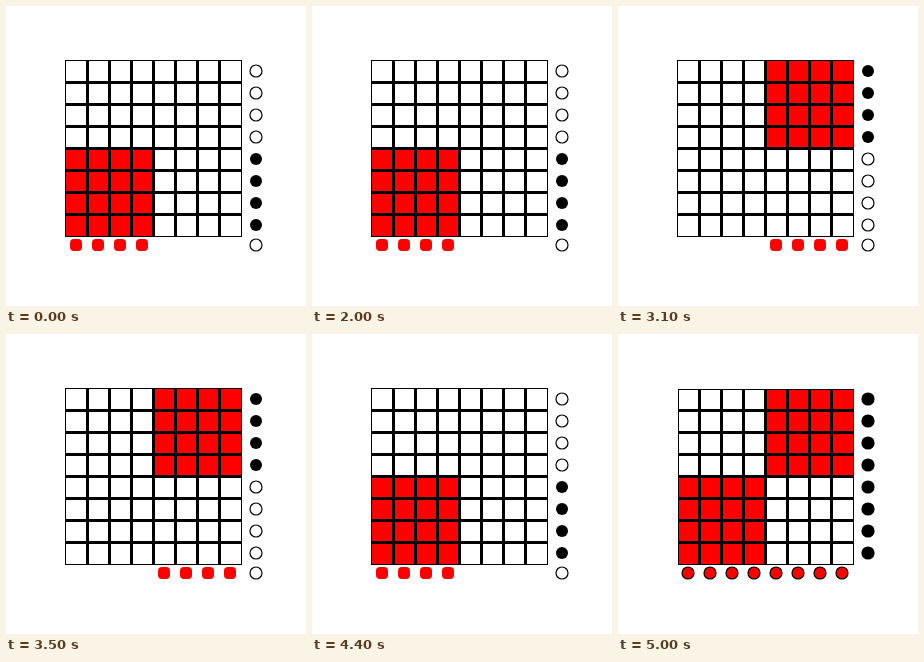
Write an HTML page with a canvas that moves like this. It is 300 by 300 pixels and loops after 10000 ms.

```html
<!DOCTYPE html>
<html lang="en">
<head>
<meta charset="utf-8">
<title>Grid toggle</title>
<style>
html, body { margin: 0; width: 100%; height: 100%; overflow: hidden; background: #fff; }
canvas { display: block; width: 300px; height: 300px; }
</style>
</head>
<body>
<canvas id="stage" width="300" height="300"></canvas>
<script>
const ctx = document.getElementById('stage').getContext('2d');
const LOOP = 10000, N = 8, STEP = 22, X0 = 59, Y0 = 54;
const RED = '#f00', BLACK = '#000', WHITE = '#fff';
const DOT_X = 250, DOT_Y = 239;
const cells = [...Array(N).keys()];
const centre = (origin, i) => origin + 11 + i * STEP;

function stateAt(t) {
  if (t < 1000) return 'low';
  if (t < 2000) return 'high';
  if (t < 2500) return 'low';
  if (t < 3000) return 'high';
  if (t < 5000) return Math.floor((t - 3000) / 100) % 2 ? 'high' : 'low';
  return 'both';
}

function circle(x, y, r, fill, line) {
  ctx.beginPath();
  ctx.arc(x, y, r, 0, Math.PI * 2);
  ctx.fillStyle = fill;
  ctx.fill();
  if (line) {
    ctx.strokeStyle = BLACK;
    ctx.lineWidth = line;
    ctx.stroke();
  }
}

function softDot(x, y) {
  ctx.beginPath();
  ctx.roundRect(x - 6, y - 6, 12, 12, 4);
  ctx.fillStyle = RED;
  ctx.fill();
}

function drawGrid(isRed, inset) {
  const size = N * STEP;
  ctx.fillStyle = WHITE;
  ctx.fillRect(X0, Y0, size, size);
  for (const row of cells) for (const col of cells) {
    ctx.fillStyle = isRed(row, col) ? RED : WHITE;
    ctx.fillRect(X0 + col * STEP, Y0 + row * STEP, STEP, STEP);
  }
  ctx.fillStyle = BLACK;
  for (let i = 1; i < N; i++) {
    ctx.fillRect(X0 + i * STEP - 1, Y0 + inset, 3, size - inset);
    ctx.fillRect(X0 + inset, Y0 + i * STEP - 1, size - inset, 3);
  }
  if (inset) {
    ctx.fillStyle = WHITE;
    ctx.fillRect(X0, Y0, size, 1);
    ctx.fillRect(X0, Y0, 1, size);
  }
  ctx.strokeStyle = BLACK;
  ctx.lineWidth = 1;
  ctx.strokeRect(X0 + inset + .5, Y0 + inset + .5, size - inset, size - inset);
}

function draw(state) {
  const both = state === 'both';
  const rowOn = i => both || (i >= 4) === (state === 'low');
  const colOn = i => both || (i < 4) === (state === 'low');
  const isRed = (r, c) => both ? (r < 4) !== (c < 4) : rowOn(r) && colOn(c);

  ctx.fillStyle = WHITE;
  ctx.fillRect(0, 0, 300, 300);
  drawGrid(isRed, both ? 1 : 0);

  for (const i of cells) {
    const y = centre(Y0, i), x = centre(X0, i);
    if (rowOn(i)) circle(DOT_X, y, both ? 6.6 : 6, BLACK);
    else circle(DOT_X, y, 6, WHITE, 1.2);
    if (both) circle(x, DOT_Y, 6, RED, 1.2);
    else if (colOn(i)) softDot(x, DOT_Y);
  }
  if (!both) circle(DOT_X, DOT_Y, 6, WHITE, 1.2);
}

function tick() {
  draw(stateAt(performance.now() % LOOP));
  requestAnimationFrame(tick);
}
tick();
</script>
</body>
</html>
```
